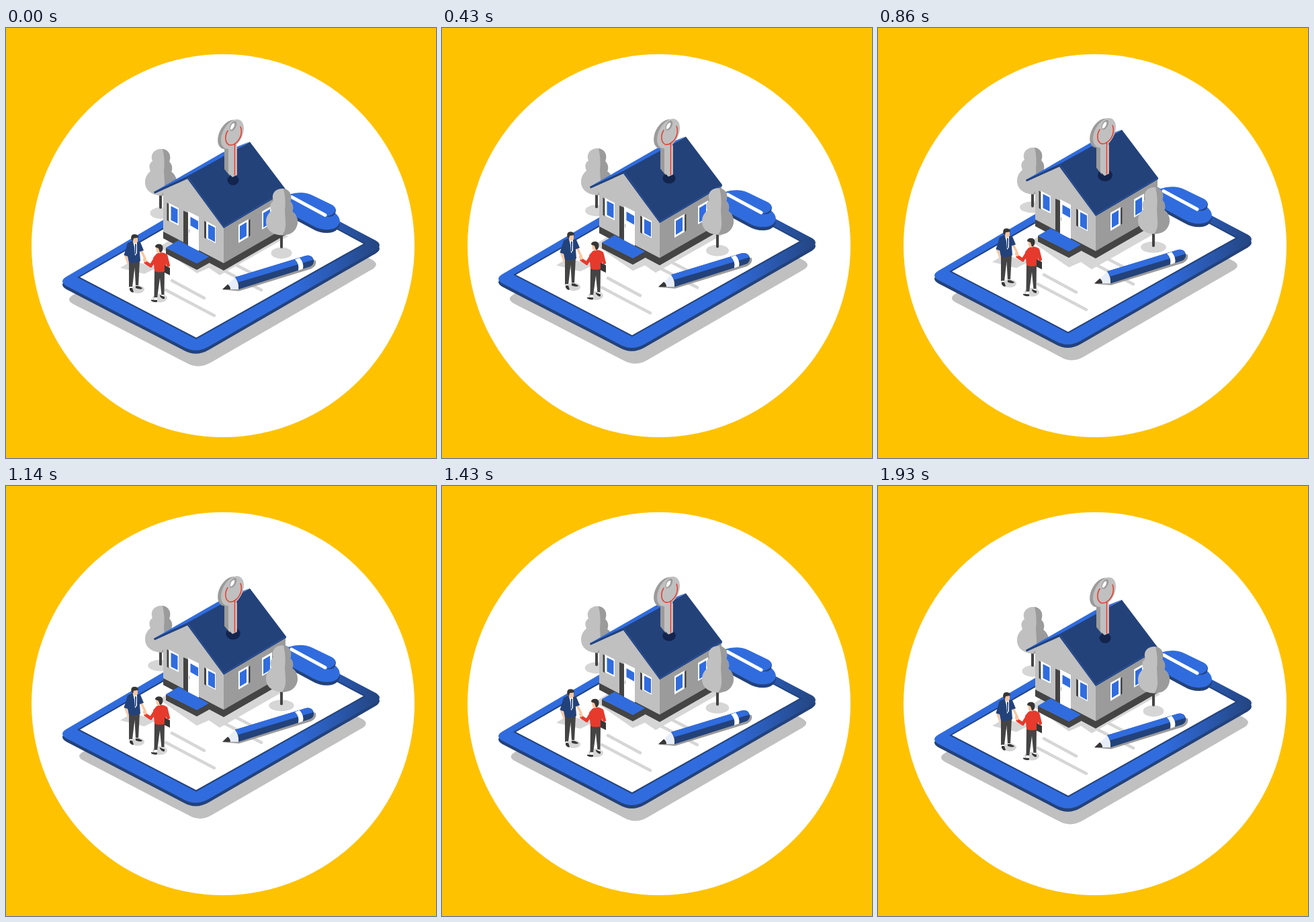
An HTML page for the animation above (2000 ms loop, 640 by 640 pixels).

```html
<!DOCTYPE html>
<html lang="en">
<head>
<meta charset="utf-8">
<title>House on a clipboard</title>
<style>
  html, body { margin: 0; width: 100%; height: 100%; overflow: hidden; background: #ffc200; }
  svg { display: block; width: 100vw; height: 100vh; }
  .blue { fill: #306cde; }
  .navy { fill: #23427a; }
  .light { fill: #c0c0c0; }
  .mid { fill: #9b9b9b; }
  .dark { fill: #444; }
  .ink { fill: #363636; }
  .white { fill: #fff; }
  .red { fill: #e63a2c; }
  .skin { fill: #f8c6a2; }
  .soft { fill: #d6d6d6; }
  .line { fill: none; stroke-linecap: round; stroke-linejoin: round; }
</style>
</head>
<body>
<svg viewBox="0 0 640 640">
  <defs>
    <linearGradient id="fade" gradientUnits="userSpaceOnUse" x1="425" y1="0" x2="552" y2="0">
      <stop offset="0" stop-color="#306cde"/>
      <stop offset="1" stop-color="#244683"/>
    </linearGradient>
    <path id="slab" d="M90 384Q78 377 90 370L356 214L546 314Q566 323 546 333L302 474Q283 485 265 475Z"/>
    <g id="tree">
      <path class="line" stroke="#444" stroke-width="4" d="M230 246V267"/>
      <path class="light" d="M231 180C241 180 247 190 243 199C248 204 248 210 246 214C254 219 256 231 252 238Q247 249 231 249.500C215 249 207 240 207 230C207 221 211 217 215 213C212 206 213 202 218 198C214 188 221 180 231 180Z"/>
      <path class="mid" d="M233 180C242 181 247 190 243 199C248 204 248 210 246 214C254 219 256 231 252 238Q247 249 231 249.500Q237 242 236 230L235 212Q237 196 233 180Z"/>
    </g>
  </defs>

  <circle class="white" cx="323" cy="324" r="285"/>
  <g id="cast"><use href="#slab" class="light" transform="translate(12.700 39) scale(.968)"/></g>

  <g class="ground">
    <use href="#slab" class="navy" y="5"/>
    <use href="#slab" fill="url(#fade)"/>
    <path class="white" stroke="#23427a" stroke-width="2" d="M108 371L358 227L534 321L283 462Z"/>

    <!-- clip -->
    <path class="navy" d="M400 262L488 276Q497 282 497 293Q493 305 478 305Q466 305 456 299L400 269Z"/>
    <path class="blue" d="M400 262L488 274Q497 280 497 289Q493 300 478 300Q466 300 456 294L400 264Z"/>
    <path class="navy" d="M400 262L480 281Q491 281 491 270L470 268Z"/>
    <path class="blue" d="M400 258Q420 245 438 245Q448 245 456 249L485 263Q493 268 490 273Q486 279 478 280L462 284Z"/>
    <path class="line" stroke="#fff" stroke-width="5" d="M425 251.500L475 278.500"/>

    <path class="line" stroke="#d6d6d6" stroke-width="4.500" d="M247 376L295 402M238 390L310 428M318 340L368 366M297 347L380 390"/>
    <path class="soft" d="M228 326L284 365L302 357L318 368L420 310L330 260Z"/>
    <path class="soft" d="M170 357L188 346L224 357L206 366Z"/>
    <ellipse class="soft" cx="196" cy="389" rx="10" ry="6"/>
    <ellipse class="soft" cx="229" cy="402" rx="11" ry="6.500"/>
    <ellipse class="soft spot" cx="230" cy="275.500" ry="8.500"/>
    <ellipse class="soft spot" cx="410" cy="335" ry="8.500"/>
  </g>

  <use href="#tree" class="float"/>

  <g id="house">
    <path class="light" d="M234 240L270 222L324 296V351L234 304Z"/>
    <path class="mid" d="M324 296L416 241V299L324 351Z"/>
    <path class="dark" d="M234 303L324 350L416 297V308L324 361L234 313Z"/>
    <path class="blue" d="M220 244L322 185.500L363 169L271 223L222 246Z"/>
    <path class="navy" d="M220 244L270 220.500L363 169.500L417 241V243L324 298L270 224.500L221 246.500Z"/>
    <path class="line" stroke="#2c58ac" d="M271 222L324 296L416 241.500"/>

    <!-- windows and door -->
    <path class="dark" d="M239.500 260L242.500 262V288L239.500 286ZM295 287L298 289V314L295 312ZM264 272L271 275V324L264 320ZM361 286L363.500 284.500V309L361 311Z"/>
    <path class="white" d="M242.500 260.500L257 268V294L242.500 287ZM298 287.500L312 295V320.500L298 313ZM271 273L287 281V332L271 324ZM346 293L361 284.500V311L346 320ZM381 273L396 264.500V291L381 300Z"/>
    <path class="blue" d="M245.500 265L255.500 270V291L245.500 286ZM301 292L311 297V318.500L301 313ZM274.500 281L286 287.500V300.500L274.500 294ZM348 295L358 289V309.500L348 315.500ZM383 275.500L393 269.500V291L383 297Z"/>
    <path class="line" stroke="#b5b5b5" stroke-width="1.300" d="M272.700 300V304"/>

    <!-- porch -->
    <path class="dark" d="M238 327L284 350L302 340V350L284 360L238 336Z"/>
    <path class="blue" d="M238 327L257 316L302 340.500L284 350.500Z"/>
  </g>

  <ellipse id="hole" cx="338" fill="#13244d"/>
  <g class="float">
    <path class="mid" d="M325 176H333V220L325 210Z"/>
    <ellipse class="mid" cx="332" cy="158.500" rx="14.500" ry="23.500" transform="rotate(28 332 158.500)"/>
    <path class="light" d="M331 174H343.500V219L337 222L331 216Z"/>
    <ellipse class="light" cx="337" cy="158" rx="14.500" ry="23.800" transform="rotate(28 337 158)"/>
    <path stroke="#eec8b8" stroke-width="2" d="M342.500 176V219"/>
    <path class="line" stroke="#e63a2c" stroke-width="1.500" d="M330 153C325 161 326 171 332 174C339 176 348 168 350 158Q351 151 349 147M340.500 173V219"/>
    <ellipse class="mid" cx="338" cy="146" rx="4.200" ry="8" transform="rotate(28 338 146)"/>
    <ellipse class="white" cx="337" cy="146.500" rx="2.300" ry="5.500" transform="rotate(28 337 146.500)"/>
  </g>

  <use href="#tree" class="float" x="180" y="59"/>

  <g class="ground">
    <!-- pencil -->
    <path class="mid" d="M322 389.500L347 391.500L454 358.500Q463 354 461 346L450 344Z"/>
    <path fill="#e8eef9" d="M330 382L341 371Q348 379 346 389L333 389Z"/>
    <path class="ink" d="M322 389L330 381.500Q334 384 334 389Z"/>
    <path class="navy" d="M341 371L446 339Q455 337 458 345Q459 352 453 355L346 389Q347 379 341 371Z"/>
    <path class="blue" d="M341 371L446 339Q455 337 457.500 345L345.500 378.500Q344 374 341 371Z"/>
    <path class="white" d="M430 344.500L437 342Q444 350 442 358.500L435 361Q437 351 430 344.500Z"/>

    <!-- man in blue -->
    <path class="line" stroke="#f8c6a2" stroke-width="3.500" d="M177.500 338L182 350M201 331L207 343"/>
    <path class="dark" d="M183 346H199L197 384H193L191.500 356L188 386H183Z"/>
    <path class="white" d="M183.500 385H188V389H184ZM193 383H197V386H193Z"/>
    <path class="ink" d="M184 387L188 387L190 393Q187 395 184 390ZM193 384L197 384L203 387Q202 390 193 387Z"/>
    <path class="navy" d="M187 317L181 320L175.500 338L181 340L183 349Q192 351 200 347L199 333L205 331L200 319Z"/>
    <path class="white" d="M189 318L195 318L195 335L192 339L191 326Z"/>
    <path class="navy" d="M192 321L194 322L193.500 335L192 337Z"/>
    <path class="skin" d="M188 311H196V318Q192 323 189 318Z"/>
    <path class="ink" d="M186.500 315Q185 307 191 307Q197 307 197 312L190 313L189 317Z"/>

    <!-- man in red -->
    <path class="dark" d="M221 361H236L235.500 398H231.500L229 372L225 402H220.500Z"/>
    <path class="white" d="M220.500 401H225V405H220.500ZM231 397H235.500V400H231Z"/>
    <path class="ink" d="M216 404.500L225 405V407.500Q220 409 216 406ZM229 397.500L236 400V403Q232 404 229 399Z"/>
    <path class="line" stroke="#e63a2c" stroke-width="5" d="M223 342L215.500 354L208 349M238 339L241.500 353"/>
    <path class="skin" d="M204 343L208 342L210 347L207 349L204 346Z"/>
    <path class="red" d="M224 336Q231 332 238 336L240 342L237 362Q229 365 221 362L219 342Z"/>
    <path class="ink" d="M236 353L244 357V368L236 364Z"/>
    <path class="skin" d="M223 326H231V334Q227 337 224 333Z"/>
    <path class="ink" d="M222 326Q222 321.500 228 321.500Q234 322 233.500 328Q233 334 229 334L227 328Z"/>
  </g>
</svg>
<script>
  const LOOP = 2000, STEPS = 28;
  const all = s => document.querySelectorAll(s);
  const house = all('#house'), ground = all('.ground'), floats = all('.float');
  const spots = all('.spot'), [hole] = all('#hole'), [cast] = all('#cast');
  const start = performance.now();

  const lift = (nodes, y) => nodes.forEach(n => n.setAttribute('transform', `translate(0 ${-y})`));
  const set = (node, attrs) => {
    for (const key in attrs) node.setAttribute(key, attrs[key]);
  };

  function draw() {
    // the small lead keeps each step on time despite display latency
    const time = (performance.now() - start + 10) % LOOP;
    const step = Math.floor(time / LOOP * STEPS);
    const p = (1 - Math.cos(2 * Math.PI * step / (STEPS - 1))) / 2;

    lift(house, 18.5 * p);
    lift(ground, 9 * p);
    lift(floats, 2 * p);
    spots.forEach(s => set(s, { rx: 15.5 + 3.5 * p }));
    set(hole, { cy: 226.5 - 7.5 * p, rx: 8.5 + 2.5 * p, ry: 7.5 + 1.5 * p });
    set(cast, { transform: `translate(322.5 375) scale(${1 - 0.072 * p}) translate(-322.5 -375)` });
    requestAnimationFrame(draw);
  }
  draw();
</script>
</body>
</html>
```
